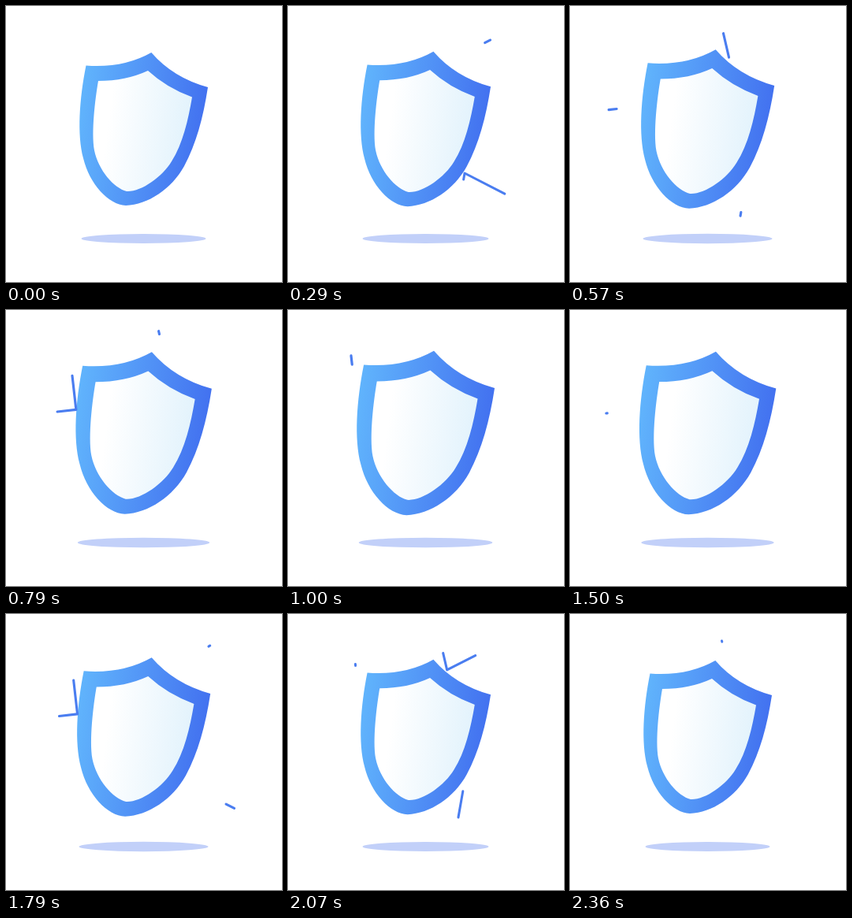
These frames come from a looping animation (350 px wide and 350 px high, 2.43 s). An HTML page:

```html
<!DOCTYPE html>
<html>
<head>
<meta charset="utf-8">
<style>
  html, body { margin: 0; width: 100%; height: 100%; overflow: hidden; background: #fff; }
  svg { display: block; width: 100vw; height: 100vh; }
  polyline { fill: none; stroke: #4a7df0; stroke-width: 3; stroke-linecap: round; stroke-linejoin: round; }
</style>
</head>
<body>
<svg viewBox="0 0 350 350">
  <defs>
    <linearGradient id="rim" x1="0" y1=".42" x2="1" y2=".58">
      <stop offset="0" stop-color="#60b3fc"/>
      <stop offset="1" stop-color="#416eef"/>
    </linearGradient>
    <linearGradient id="face" x1="0" y1=".42" x2="1" y2=".58">
      <stop offset=".15" stop-color="#fff"/>
      <stop offset="1" stop-color="#e1f2fc"/>
    </linearGradient>
  </defs>
  <ellipse id="shadow" rx="79" ry="5.9" fill="#c2d0f9"/>
  <g id="scene">
    <path fill="url(#rim)" d="M101.5 75.5Q149 79 184.3 59Q212 91 256 103C250 142 241 175 226 203C210 232 180 252 152 253C130 252 106 226 98 193C90 163 93 118 101.5 75.5Z"/>
    <path fill="url(#face)" d="M117 95Q152 95 180 82Q204 104 236 115.5C231 145 224 175 210 197C198 217 171 236 153 235C137 231 117 208 112 183C108 160 113 118 117 95Z"/>
  </g>
</svg>
<script>
const LOOP = 2430, STEPS = 34, CX = 174.5, CY = 156;
const scene = document.getElementById('scene');
const shadow = document.getElementById('shadow');

// Each bolt flies in, bounces off the shield and leaves, centred on the given times.
const bolts = [
  { points: '285.2,243 223.4,211.3 214.5,262', mids: [305, 2005] },
  { points: '255.5,44.5 201.3,72 192.5,34', mids: [520, 2070] },
  { points: '53.8,132.5 93.7,128 86.5,64.7', mids: [790, 1790] }
];
for (const bolt of bolts) {
  bolt.line = document.createElementNS('http://www.w3.org/2000/svg', 'polyline');
  bolt.line.setAttribute('points', bolt.points);
  bolt.line.setAttribute('pathLength', 1);
  scene.append(bolt.line);
}

// Progress of a bolt's tip: slow start, fast strike, gentle finish.
const curve = [[-300, 0], [-270, .033], [-227, .085], [-130, .18], [-50, .36],
  [-18, .65], [0, .815], [18, .89], [50, .945], [150, 1]];
function tip(ms) {
  const i = curve.findIndex(([x]) => x > ms);
  if (i < 0) return 1;
  if (i === 0) return 0;
  const [x0, y0] = curve[i - 1], [x1, y1] = curve[i];
  return y0 + (y1 - y0) * (ms - x0) / (x1 - x0);
}

function drawBolt({ line, mids }, t) {
  const mid = mids.find(m => Math.abs(t - m) < 300);
  const head = mid ? tip(t - mid) : 0;
  const tail = mid ? 1 - tip(mid - t) : 0;
  const length = head - tail;
  line.style.visibility = length > .003 ? 'visible' : 'hidden';
  line.style.strokeDasharray = `${Math.max(length, 0)} 2`;
  line.style.strokeDashoffset = -tail;
}

function frame(now) {
  // The motion advances in even steps.
  const step = Math.floor((now % LOOP) / LOOP * STEPS + .06) % STEPS;
  const t = step * LOOP / STEPS;
  const scale = 1 + .039 * (1 - Math.cos(2 * Math.PI * (step + .5) / STEPS));
  scene.setAttribute('transform',
    `translate(${CX} ${CY}) scale(${scale}) translate(${-CX} ${-CY})`);
  shadow.setAttribute('transform', `translate(${CX} 295) scale(${scale})`);
  bolts.forEach(bolt => drawBolt(bolt, t));
  requestAnimationFrame(() => frame(performance.now()));
}
frame(performance.now());
</script>
</body>
</html>
```
